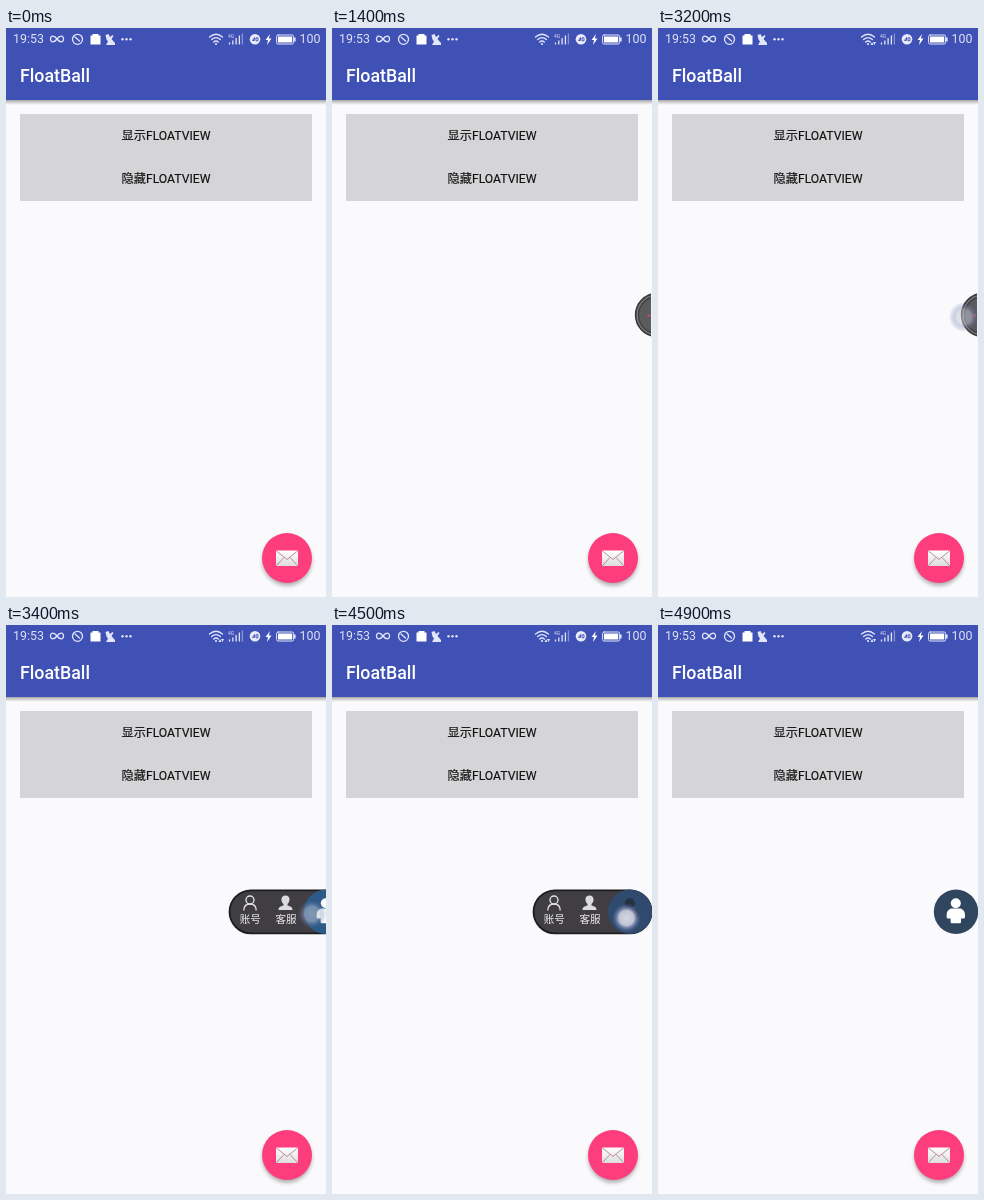
An HTML page for the animation above (5100 ms loop, 320x569 px).

```html
<!DOCTYPE html>
<html lang="zh">
<head>
<meta charset="utf-8">
<title>FloatBall</title>
<style>
  html, body { margin: 0; width: 100%; height: 100%; overflow: hidden; background: #faf9fc; }
  svg { display: block; width: 100vw; height: 100vh; }
  text { font-family: Roboto, "Noto Sans CJK SC", "Noto Sans CJK", sans-serif; }
  .bar text { fill: #dfe2f5; font-size: 12.4px; }
  .button { font-size: 12.2px; font-weight: 400; fill: #111; stroke: #111; stroke-width: .15; text-anchor: middle; }
  .label { font-size: 10.6px; fill: #ececee; text-anchor: middle; }
  .line { fill: none; stroke: #e3e6f8; stroke-width: 1.3; stroke-linecap: round; }
</style>
</head>
<body>
<svg viewBox="0 0 320 569">
  <defs>
    <linearGradient id="shade" x1="0" y1="0" x2="0" y2="1">
      <stop offset="0" stop-color="#777" stop-opacity=".65"/>
      <stop offset="1" stop-color="#999" stop-opacity="0"/>
    </linearGradient>
    <linearGradient id="paper" x1="0" y1="0" x2="0" y2="1">
      <stop offset="0" stop-color="#fff"/>
      <stop offset="1" stop-color="#ddd"/>
    </linearGradient>
    <radialGradient id="glow">
      <stop offset="0" stop-color="#d5d7e0"/>
      <stop offset=".5" stop-color="#bfc3d2"/>
      <stop offset=".62" stop-color="#8d98bd" stop-opacity=".85"/>
      <stop offset="1" stop-color="#3c5690" stop-opacity="0"/>
    </radialGradient>
    <filter id="soft" x="-30%" y="-30%" width="160%" height="160%"><feGaussianBlur stdDeviation="2"/></filter>
  </defs>

  <rect width="320" height="569" fill="#faf9fc"/>
  <rect y="72" width="320" height="5" fill="url(#shade)"/>
  <rect width="320" height="72" fill="#3f51b5"/>

  <g class="bar">
    <text x="7" y="15.3">19:53</text>
    <path class="line" d="M51 11C48.500 7.500 44.500 7 44.500 11S48.500 14.500 51 11S57.500 7 57.500 11S53.500 14.500 51 11Z"/>
    <circle class="line" cx="71.500" cy="11.300" r="5"/>
    <path class="line" d="M69 9L73.500 13"/>
    <path fill="#fff" d="M84.500 7.500h2v-1.500h6v1.500h2v9h-10z"/>
    <path fill="#e3e6f8" d="M99.500 7l3-1 1.500 3 2.500-2 1 1-2 3 3.500 4v2h-9l2-3.500-1.500-2z"/>
    <g fill="#e3e6f8"><circle cx="116.500" cy="11.300" r="1.200"/><circle cx="120.500" cy="11.300" r="1.200"/><circle cx="124.500" cy="11.300" r="1.200"/></g>
    <path class="line" d="M203.500 9Q210 3.500 216.500 9M205.600 11.500Q210 7.800 214.400 11.500M207.700 14Q210 12 212.300 14"/>
    <circle cx="210" cy="16" r="1.100" fill="#e3e6f8"/>
    <path id="traffic" fill="#e3e6f8" d="M212.500 17l1.500-3 1.500 3zM215 14h3l-1.500 3z"/>
    <text x="222" y="10" style="font-size:5px">4G</text>
    <path class="line" style="stroke-linecap:butt" d="M223.500 16.500v-2M226.800 16.500v-4M230.100 16.500v-6.500M233.400 16.500v-9"/>
    <path class="line" style="stroke-linecap:butt;opacity:.45" d="M236.400 16.500v-11"/>
    <circle cx="249" cy="11.300" r="5.300" fill="#e9ebf9"/>
    <path d="M246.500 12.500h2v-3l-2 3M250 9.800h2v3h-2z" fill="none" stroke="#3f51b5" stroke-width=".9"/>
    <path fill="#fff" d="M264 6l-4.500 6h2.500l-1 5 4.500-6.500h-2.700z"/>
    <rect class="line" x="270.600" y="7" width="17" height="9" rx="1.500" style="stroke-width:1"/>
    <rect x="272" y="8.500" width="14.200" height="6" fill="#fff"/>
    <rect x="288" y="9.500" width="1.600" height="4" fill="#e3e6f8"/>
    <text x="293.500" y="15.300">100</text>
  </g>
  <text x="14" y="54" fill="#fff" font-size="17.800" font-weight="500">FloatBall</text>

  <rect x="14" y="86" width="292" height="87" fill="#d5d4d7"/>
  <text class="button" x="160" y="112.300">显示FLOATVIEW</text>
  <text class="button" x="160" y="155.300">隐藏FLOATVIEW</text>

  <circle cx="281" cy="533" r="24.500" fill="#000" opacity=".32" filter="url(#soft)"/>
  <circle cx="281" cy="530" r="25" fill="#fe3d7d"/>
  <rect x="270" y="522.500" width="22" height="15.500" rx="1" fill="url(#paper)"/>
  <path d="M270.500 523l10.500 8.500 10.500-8.500M270.500 537.500l7.500-8M291.500 537.500l-7.500-8" fill="none" stroke="#b98a9a" stroke-width="1"/>

  <g id="docked">
    <circle cx="325" cy="287" r="21.500" fill="#5b5a5d" stroke="#38373a" stroke-width="1.400"/>
    <circle cx="325" cy="287" r="19.800" fill="none" stroke="#98979a" stroke-width=".7"/>
    <circle cx="325" cy="287" r="18.500" fill="none" stroke="#434245" stroke-width="1.500"/>
    <path d="M315.500 287.500h3" stroke="#d04a7c" stroke-width="1.600"/>
    <rect x="319" y="264" width="1" height="46" fill="#f3f2f5"/>
  </g>

  <g id="floating">
    <g id="menu">
      <rect x="201.500" y="265.300" width="118" height="43" rx="21.500" fill="#403e42" stroke="#1d1c20" stroke-width="1.800"/>
      <g fill="none" stroke="#e4e4e6" stroke-width="1.300">
        <circle cx="222" cy="275" r="4"/>
        <path d="M215.800 285.500C215.800 281 218.500 279 222 279S228.200 281 228.200 285.500"/>
      </g>
      <path fill="#dcdcde" d="M257.500 270.500c5 0 5 6 2 8.500v1.500c3 1 5 1.500 5 4.500h-14c0-3 2-3.500 5-4.500v-1.500c-3-2.500-3-8.500 2-8.500z"/>
      <text class="label" x="222.300" y="298">账号</text>
      <text class="label" x="258" y="298">客服</text>
    </g>
    <circle id="ball" cx="298" cy="286.700" r="22.200"/>
    <g id="person">
      <circle cx="297.800" cy="278.300" r="5"/>
      <path d="M293 283.500h9.600q4.400 1.500 4.400 6.500v2q0 1.500-1.800 1.500h-2.200v3.500q0 1.300-1.300 1.300h-7.800q-1.300 0-1.300-1.300v-3.500h-2.200q-1.800 0-1.800-1.500v-2q0-5 4.400-6.500z"/>
    </g>
  </g>
  <circle id="touch" r="15" fill="url(#glow)"/>
</svg>
<script>
const LOOP = 5100, STEP = 100;
const el = id => document.getElementById(id);
const show = (id, on) => el(id).setAttribute("visibility", on ? "visible" : "hidden");
const set = (id, attrs) => {
  for (const key in attrs) el(id).setAttribute(key, attrs[key]);
};
const clamp = v => Math.min(1, Math.max(0, v));

function draw(ms) {
  const t = Math.floor(ms % LOOP / STEP) * STEP;
  const open = t >= 3300;
  const firstTap = t >= 3200 && t < 3700;
  const lastTap = t >= 4500 && t < 4900;
  const held = t >= 4500 && t < 4700;

  show("traffic", t >= 2400);
  show("docked", t >= 1000 && !open);
  show("floating", open);
  show("menu", t >= 3400 && t < 4700);

  // The half-hidden ball slides fully onto the screen after the menu opens.
  const slide = clamp((t - 3400) / 200);
  set("floating", { transform: `translate(${22 * (1 - slide)} 0)` });
  set("ball", { fill: firstTap ? "#2b5b86" : held ? "#2f4a6c" : "#30465f" });
  set("person", { fill: held ? "#25313f" : "#fff" });

  show("touch", firstTap || lastTap);
  const fade = firstTap ? 0.5 * (1 - clamp((t - 3400) / 300)) : 1 - clamp((t - 4600) / 300);
  set("touch", {
    cx: firstTap ? 306 : 294.5,
    cy: firstTap ? 289 : 293,
    opacity: fade
  });
}

const start = performance.now();
function tick() {
  draw(performance.now() - start);
  requestAnimationFrame(tick);
}
draw(0);
requestAnimationFrame(tick);
</script>
</body>
</html>
```
